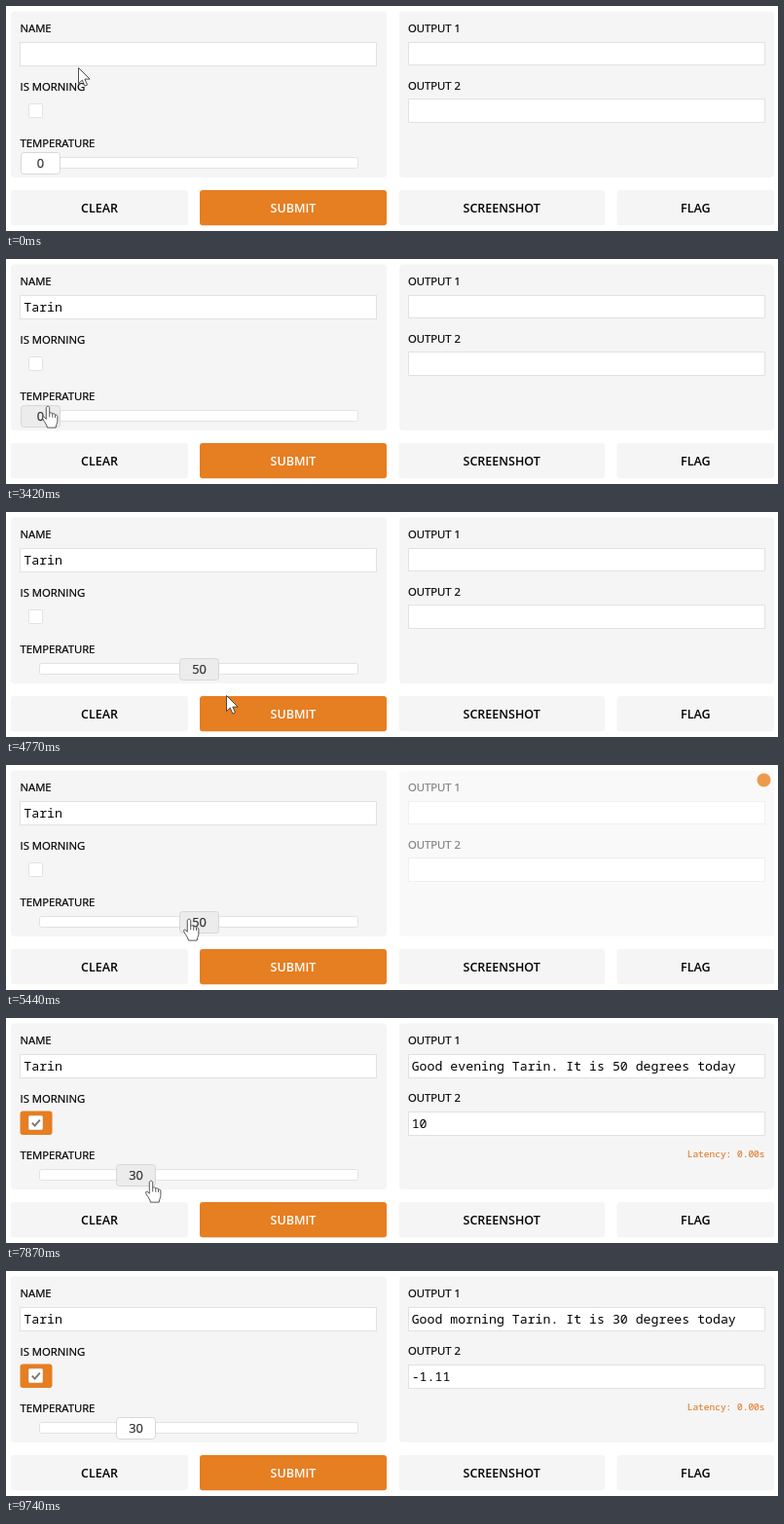
These frames come from a looping animation (793x231 px, 9.84 s). An HTML page:

```html
<!DOCTYPE html>
<html lang="en">
<head>
<meta charset="utf-8">
<title>Form demo</title>
<style>
  html, body { margin: 0; width: 100%; height: 100%; overflow: hidden; background: #fff; }
  svg { display: block; width: 793px; height: 231px; }
  text { font-family: "Open Sans", sans-serif; white-space: pre; }
  .label { font-size: 11.3px; stroke: #000; stroke-width: .22px; }
  .btn { font-size: 12.5px; font-weight: 600; text-anchor: middle; }
  .num { font-size: 12.8px; text-anchor: middle; fill: #333; stroke: #333; stroke-width: .25px; }
  .mono { font-family: "Noto Sans Mono", monospace; font-size: 13.22px; }
  .latency { font-family: "Noto Sans Mono", monospace; font-size: 9.5px; fill: #e07a26; stroke: #e07a26; stroke-width: .12px; }
  .panel { fill: #f5f5f5; }
  .field { fill: #fff; stroke: #e2e2e2; }
  .pointer { fill: #fff; stroke: #3c3c3c; stroke-width: .9; stroke-linejoin: round; }
</style>
</head>
<body>
<svg viewBox="0 0 793 231">
  <rect class="panel" x="5" y="5.5" width="386" height="170.5" rx="4"/>
  <text class="label" x="14.5" y="27.3">NAME</text>
  <rect class="field" x="14.5" y="37.5" width="366" height="24"/>
  <text id="name" class="mono" x="18.3" y="54"></text>
  <rect id="caret" y="42" width="1" height="15"/>
  <text class="label" x="14.5" y="86.7">IS MORNING</text>
  <rect id="tick" x="14.5" y="95.5" width="33" height="24.5" rx="3" fill="#e67e22"/>
  <rect class="field" x="23.5" y="100.5" width="14" height="14" rx="1"/>
  <path id="check" d="M26.8 107.6L29.6 110.6L34.8 104.6" fill="none" stroke="#777" stroke-width="1.9"/>
  <text class="label" x="14.5" y="145">TEMPERATURE</text>
  <rect class="field" x="34.5" y="155.5" width="327" height="11" rx="2"/>
  <g id="handle">
    <rect id="knob" x=".5" y="150.5" width="40" height="22" rx="3" stroke="#d8d8d8"/>
    <text id="value" class="num" x="20.5" y="165.7"></text>
  </g>

  <g id="output">
    <rect class="panel" x="404" y="5.5" width="385" height="170.5" rx="4"/>
    <text class="label" x="413" y="27.3">OUTPUT 1</text>
    <rect id="box1" class="field" x="413.5" y="37.5" width="366"/>
    <text id="out1" class="mono" x="416.7" y="54"></text>
    <text class="label" x="413" y="86.3">OUTPUT 2</text>
    <rect id="box2" class="field" x="413.5" width="366" height="24"/>
    <text id="out2" class="mono" x="416.7" y="113"></text>
    <text id="latency" class="latency" x="779.5" y="143" text-anchor="end">Latency: 0.00s</text>
  </g>
  <circle id="loader" cx="778.5" cy="15.5" r="7" fill="#ee9a4d"/>

  <g id="buttons"></g>

  <g id="cursor" class="pointer">
    <path id="arrow" d="M0 0V16L3.8 12.6L6.4 18.6L9 17.5L6.4 11.6H11.6Z"/>
    <path id="hand" transform="translate(-.5 -.5) scale(.95)" d="M-1.8 14V2C-1.8 -.4 1.8 -.4 1.8 2V8C2.2 6.6 5 6.8 5 8.8C5.6 7.6 7.9 8 7.9 9.8C8.7 9 10.4 9.6 10.4 11.2V16C10.4 18.5 9 19.5 8.6 23.3H-.6C-.8 20.3 -3.6 17.6 -5.6 13.6C-6.2 11.6 -4.2 11 -3.2 12.4ZM1.8 8V12M5 8.8V12.4M7.9 9.8V12.6"/>
    <path id="beam" fill="none" d="M-4 -15H-1.5L0 -14L1.5 -15H4M0 -14V14M-4 15H-1.5L0 14L1.5 15H4"/>
  </g>
</svg>
<script>
// All times below are in ticks, the steps in which the screen updates
const LOOP = 9840, TICKS = 101;
const NAME = 'Tarin';
const KEYS = [13, 15, 16, 18, 18];   // when each letter is typed
const FIRST_RUN = 57, SECOND_RUN = 89;

// Pointer moves: from, to, x, y
const MOVES = [
  [0, 3, 77, 45],      // name field
  [8, 10, 128, 45],
  [23, 31, 42, 133],   // slider
  [32, 35, 43, 151],
  [36, 44, 206, 158],  // drag
  [44, 49, 226, 188],  // submit
  [49, 51, 242, 199],
  [52, 56, 188, 158],
  [56, 65, 30, 104],   // checkbox
  [67, 72, 187, 148],  // slider
  [72, 74, 190, 159],
  [75, 78, 125, 159],  // drag
  [80, 87, 243, 198],  // submit
  [94, 100, 266, 245]  // leave
];
const SLIDES = [[36, 44, 50], [75, 78, 30]];

const $ = id => document.getElementById(id);
const set = (id, attrs) => { for (const k in attrs) $(id).setAttribute(k, attrs[k]); };
const show = (id, on) => set(id, { visibility: on ? 'visible' : 'hidden' });
const write = (id, s) => { if ($(id).textContent !== s) $(id).textContent = s; };
const during = (t, a, b) => t >= a && t < b;
const inside = (x, y, l, top, r, b) => x >= l && x <= r && y >= top && y <= b;
const easeOut = u => 1 - (1 - u) ** 1.5;

function addButton(label, x, w, main) {
  const fill = main ? '#e67e22' : '#f5f5f5';
  $('buttons').insertAdjacentHTML('beforeend',
    `<rect ${main ? 'id="submit"' : ''} x="${x}" y="189" width="${w}" height="36.3" rx="3" fill="${fill}"/>
     <text class="btn" x="${x + w / 2}" y="212.3" fill="${main ? '#fff' : '#000'}">${label}</text>`);
}
addButton('CLEAR', 5, 182);
addButton('SUBMIT', 199, 192, true);
addButton('SCREENSHOT', 403.5, 211.5);
addButton('FLAG', 627.5, 161.5);

// Apply every move begun so far, each easing towards its own end
function follow(moves, start, t) {
  return moves.filter(m => m[0] < t).reduce((pos, [a, b, ...end]) => {
    const u = easeOut(Math.min(1, (t - a) / (b - a)));
    return pos.map((v, i) => v + (end[i] - v) * u);
  }, start);
}

function greet(part, degrees) {
  return `Good ${part} ${NAME}. It is ${degrees} degrees today`;
}

function drawForm(t, x, y) {
  const chars = KEYS.filter(k => k <= t).length;
  write('name', NAME.slice(0, chars));
  show('caret', during(t, 6, 33));
  set('caret', { x: 18 + chars * 7.93 });

  show('tick', t >= 68);
  show('check', t >= 68);

  const value = Math.round(follow(SLIDES, [0], t)[0]);
  const left = Math.round(15 + value * 3.264);
  const onKnob = inside(x, y, left, 150, left + 41, 173);
  const focused = during(t, 33, 52) || during(t, 74, 87);
  set('handle', { transform: `translate(${left})` });
  set('knob', { fill: onKnob || focused ? '#ececec' : '#fff' });
  write('value', String(value));
  return onKnob;
}

function drawOutput(t) {
  const done = t >= FIRST_RUN, again = t >= SECOND_RUN;
  const busy = during(t, FIRST_RUN - 2, FIRST_RUN) || during(t, SECOND_RUN - 1, SECOND_RUN);
  write('out1', again ? greet('morning', 30) : done ? greet('evening', 50) : '');
  write('out2', again ? '-1.11' : done ? '10' : '');
  set('box1', { height: done ? 24 : 23 });
  set('box2', { y: done ? 96.5 : 95.5 });
  show('latency', done);
  show('loader', busy);
  set('output', { opacity: busy ? 0.5 : 1 });
}

function draw(ms) {
  const t = Math.floor(ms * TICKS / LOOP + 0.3) % TICKS;
  const [x, y] = follow(MOVES, [74, 63], t);
  const onKnob = drawForm(t, x, y);
  drawOutput(t);

  const onSubmit = inside(x, y, 199, 189, 391, 225);
  set('submit', { fill: onSubmit ? '#f39c12' : '#e67e22' });

  const onField = inside(x, y, 15, 38, 381, 62);
  const onLink = onKnob || onSubmit || inside(x, y, 15, 96, 48, 120);
  set('cursor', { transform: `translate(${Math.round(x) + .5} ${Math.round(y) + .5})` });
  show('beam', onField);
  show('hand', !onField && onLink);
  show('arrow', !onField && !onLink);
}

const start = performance.now();
function tick() {
  draw((performance.now() - start) % LOOP);
  requestAnimationFrame(tick);
}
tick();
</script>
</body>
</html>
```
